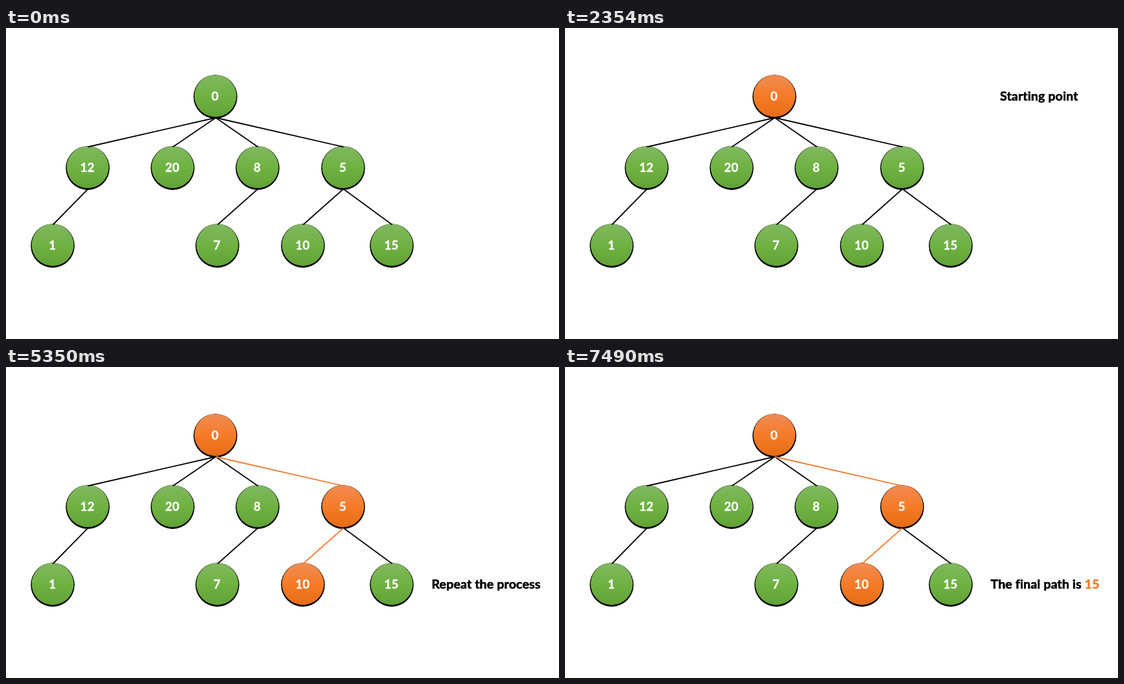
Animation, 853 px wide and 480 px high, one loop 8000 ms. Source, as an HTML page:

```html
<!DOCTYPE html>
<html lang="en">
<head>
<meta charset="utf-8">
<title>Greedy tree search</title>
<style>
  html, body { margin: 0; width: 100%; height: 100%; overflow: hidden; background: #fff; }
  svg { display: block; width: 853px; height: 480px; }
  text { font: 700 19.6px Lato, Carlito, sans-serif; stroke-width: .6; }
  .caption { letter-spacing: .12px; stroke: #000; }
  .label { font-size: 18.6px; fill: #fff; stroke: #fff; stroke-width: .4; text-anchor: middle; }
  .edge { stroke: #000; stroke-width: 1.8; }
  .disc { fill: url(#green); stroke-width: 0; }
  .accent { fill: #ed7d31; stroke: #ed7d31; }

  /* Every change is a hard cut. */
  .lit1, .lit2, .lit3, .caption { animation: 8s step-end infinite; }
  .lit1 { animation-name: lit1; }
  .lit2 { animation-name: lit2; }
  .lit3 { animation-name: lit3; }
  .start { animation-name: start; }
  .choose { animation-name: choose; }
  .repeat { animation-name: repeat; }
  .final { animation-name: final; }

  @keyframes lit1 {
    0% { fill: url(#green); stroke: #000; }
    13.375%, 100% { fill: url(#orange); stroke: #ed7d31; }
  }
  @keyframes lit2 {
    0% { fill: url(#green); stroke: #000; }
    40.125%, 100% { fill: url(#orange); stroke: #ed7d31; }
  }
  @keyframes lit3 {
    0% { fill: url(#green); stroke: #000; }
    66.875%, 100% { fill: url(#orange); stroke: #ed7d31; }
  }
  @keyframes start {
    0%, 40.125%, 100% { visibility: hidden; }
    13.375% { visibility: visible; }
  }
  @keyframes choose {
    0%, 66.875%, 100% { visibility: hidden; }
    40.125% { visibility: visible; }
  }
  @keyframes repeat {
    0%, 93.625%, 100% { visibility: hidden; }
    66.875% { visibility: visible; }
  }
  @keyframes final {
    0% { visibility: hidden; }
    93.625%, 100% { visibility: visible; }
  }
</style>
</head>
<body>
<svg viewBox="0 0 853 480">
  <defs>
    <linearGradient id="green" x2="0" y2="1">
      <stop offset="0" stop-color="#81b861"/>
      <stop offset=".5" stop-color="#6fb242"/>
      <stop offset="1" stop-color="#61a235"/>
    </linearGradient>
    <linearGradient id="orange" x2="0" y2="1">
      <stop offset="0" stop-color="#f18c55"/>
      <stop offset=".5" stop-color="#f67b28"/>
      <stop offset="1" stop-color="#e56b17"/>
    </linearGradient>
  </defs>
  <g id="nodes"></g>
  <g id="edges"></g>
  <text class="caption start" x="671" y="112">Starting point</text>
  <text class="caption choose" x="651" y="209">Choose the one with<tspan x="651" y="235">smallest value</tspan></text>
  <text class="caption repeat" x="656.5" y="342">Repeat the process</text>
  <text class="caption final" x="656.5" y="342">The final path is <tspan class="accent">15</tspan></text>
</svg>
<script>
  // value, x, y, parent value, highlight step
  const tree = [
    [0, 323, 105, null, 1],
    [12, 126, 215, 0],
    [20, 257, 215, 0],
    [8, 388, 215, 0],
    [5, 520, 215, 0, 2],
    [1, 72, 335, 12],
    [7, 326, 335, 8],
    [10, 458, 335, 5, 3],
    [15, 595, 335, 5],
  ];

  function add(parent, tag, attrs, text = '') {
    const el = document.createElementNS('http://www.w3.org/2000/svg', tag);
    for (const name in attrs) el.setAttribute(name, attrs[name]);
    el.textContent = text;
    parent.append(el);
  }

  const nodes = document.getElementById('nodes');
  const edges = document.getElementById('edges');
  const spots = new Map(tree.map(([value, x, y]) => [value, [x, y]]));

  for (const [value, x, y, parent, step] of tree) {
    const lit = step ? ` lit${step}` : '';
    add(nodes, 'circle', { cx: x, cy: y + 1.1, r: 33.8 });
    add(nodes, 'circle', { class: 'disc' + lit, cx: x, cy: y - .2, r: 32.4 });
    add(nodes, 'text', { class: 'label', x: x - .6, y: y + 7 }, value);
    if (parent === null) continue;
    const [px, py] = spots.get(parent);
    add(edges, 'line', { class: 'edge' + lit, x1: px + .5, y1: py + 33.5, x2: x + .5, y2: y - 31.5 });
  }
</script>
</body>
</html>
```
